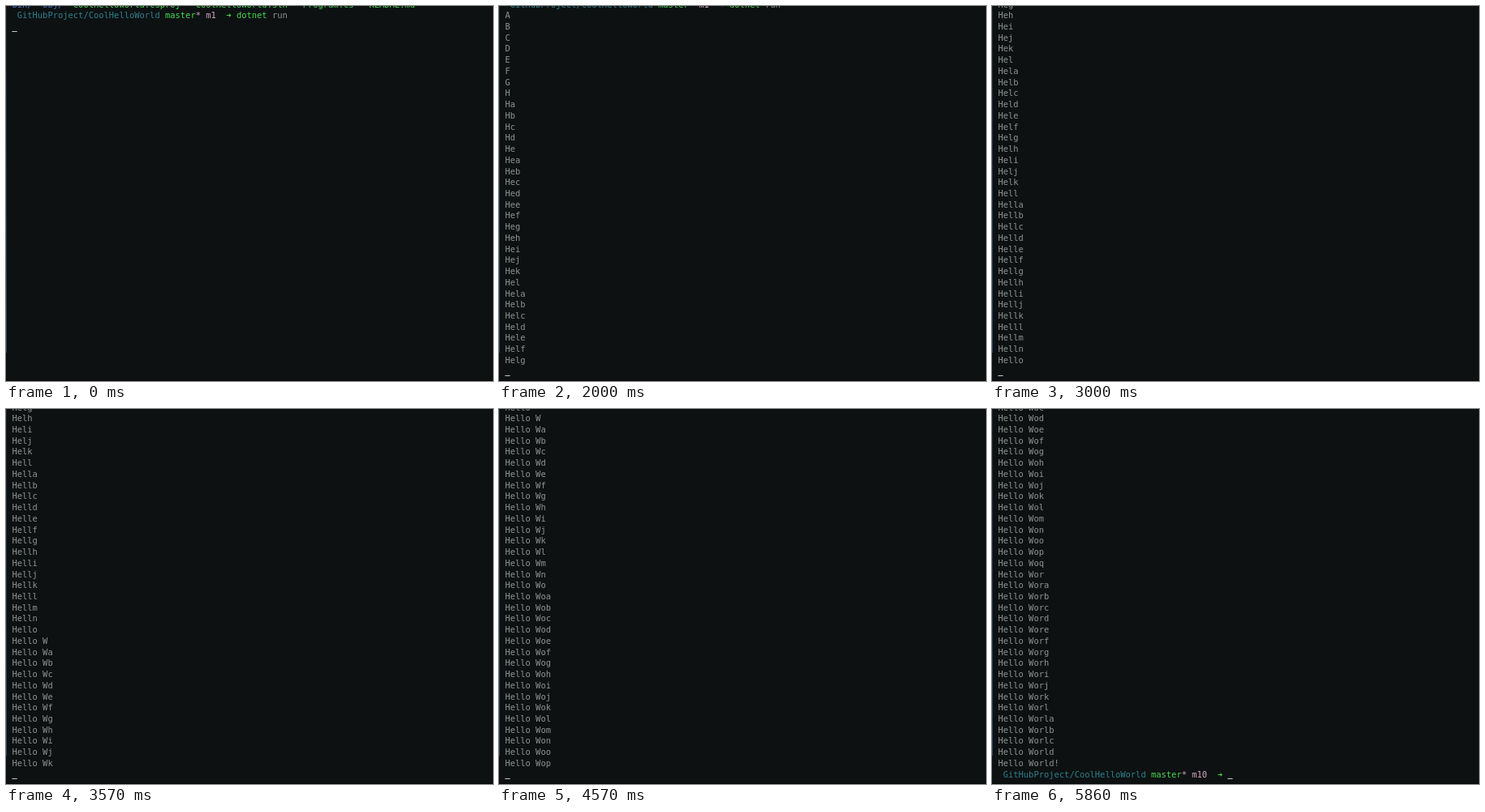
Animation of 600x463 px, one loop 6.86 s. Source, as an HTML page with a canvas:

```html
<!DOCTYPE html>
<html lang="en">
<head>
<meta charset="utf-8">
<title>Terminal</title>
<style>
html, body { margin: 0; width: 100%; height: 100%; overflow: hidden; background: #0d1112; }
canvas { display: block; }
</style>
</head>
<body>
<canvas id="stage" width="600" height="463"></canvas>
<script>
const ctx = document.getElementById('stage').getContext('2d');
const LOOP = 6860, TICK = 1000 / 7, PROMPT_AT = 5855;
const CELL = 6.285, LINE = 13.73, LEFT = 7.4, BASE = 15.3, ROWS = 32;
const GRAY = '#8e9392', GREEN = '#48d850', TEAL = '#2f808c', PINK = '#d3a3c6', BLUE = '#4573c8';

// Each letter is searched from the start of the alphabet, one guess per line.
function guesses(goal) {
  const lines = [];
  let found = '';
  for (const ch of goal) {
    const first = ch === 'H' ? 'A' : /[a-z]/.test(ch) ? 'a' : ch;
    for (let code = first.charCodeAt(0); ch !== ' ' && code <= ch.charCodeAt(0); code++) {
      lines.push([[found + String.fromCharCode(code), GRAY]]);
    }
    found += ch;
  }
  return lines;
}

const prompt = duration => [
  [' GitHubProject/CoolHelloWorld ', TEAL], ['master', GREEN],
  ['* ' + duration + '  ', PINK], ['➜ ', GREEN]
];
const listing = [
  ['bin/  obj/  ', BLUE],
  ['CoolHelloWorld.csproj*  CoolHelloWorld.sln*  Program.cs*  README.md*', GREEN]
];
const command = [...prompt('m1'), ['dotnet ', GREEN], ['run', GRAY]];
const output = guesses('Hello World!');

const baseline = row => BASE + row * LINE;

function drawLine(runs, row) {
  let col = 0;
  for (const [text, color] of runs) {
    ctx.fillStyle = color;
    for (const ch of text) ctx.fillText(ch, LEFT + col++ * CELL, baseline(row));
  }
  return col;
}

function drawBackdrop() {
  ctx.fillStyle = '#0d1112';
  ctx.fillRect(0, 0, 600, 463);
  const edge = ctx.createLinearGradient(0, 0, 0, 428);
  edge.addColorStop(0, '#182028');
  edge.addColorStop(1, '#29466a');
  ctx.fillStyle = edge;
  ctx.fillRect(0, 0, 1, 428);
  ctx.fillStyle = '#06080a';
  ctx.fillRect(0, 462, 600, 1);
}

function draw(time) {
  const tick = Math.floor((time + 3) / TICK);
  const count = Math.max(0, Math.min(output.length, Math.floor(tick * 20 / 7 - 7.3)));
  const lines = [listing, command, ...output.slice(0, count)];
  lines.push(time >= PROMPT_AT ? prompt('m10') : []);

  drawBackdrop();
  ctx.font = '10.44px "DejaVu Sans Mono", "Noto Sans Mono", monospace';
  const top = Math.max(1, lines.length - 1 - ROWS);
  let col = 0;
  for (let i = top - 1; i < lines.length; i++) col = drawLine(lines[i], i - top);

  ctx.fillStyle = '#c4c8c8';
  ctx.fillRect(LEFT + col * CELL, Math.round(baseline(lines.length - 1 - top) + 1.5), CELL, 1);
}

const start = performance.now();
function frame() {
  draw((performance.now() - start) % LOOP);
  requestAnimationFrame(frame);
}
frame();
</script>
</body>
</html>
```
